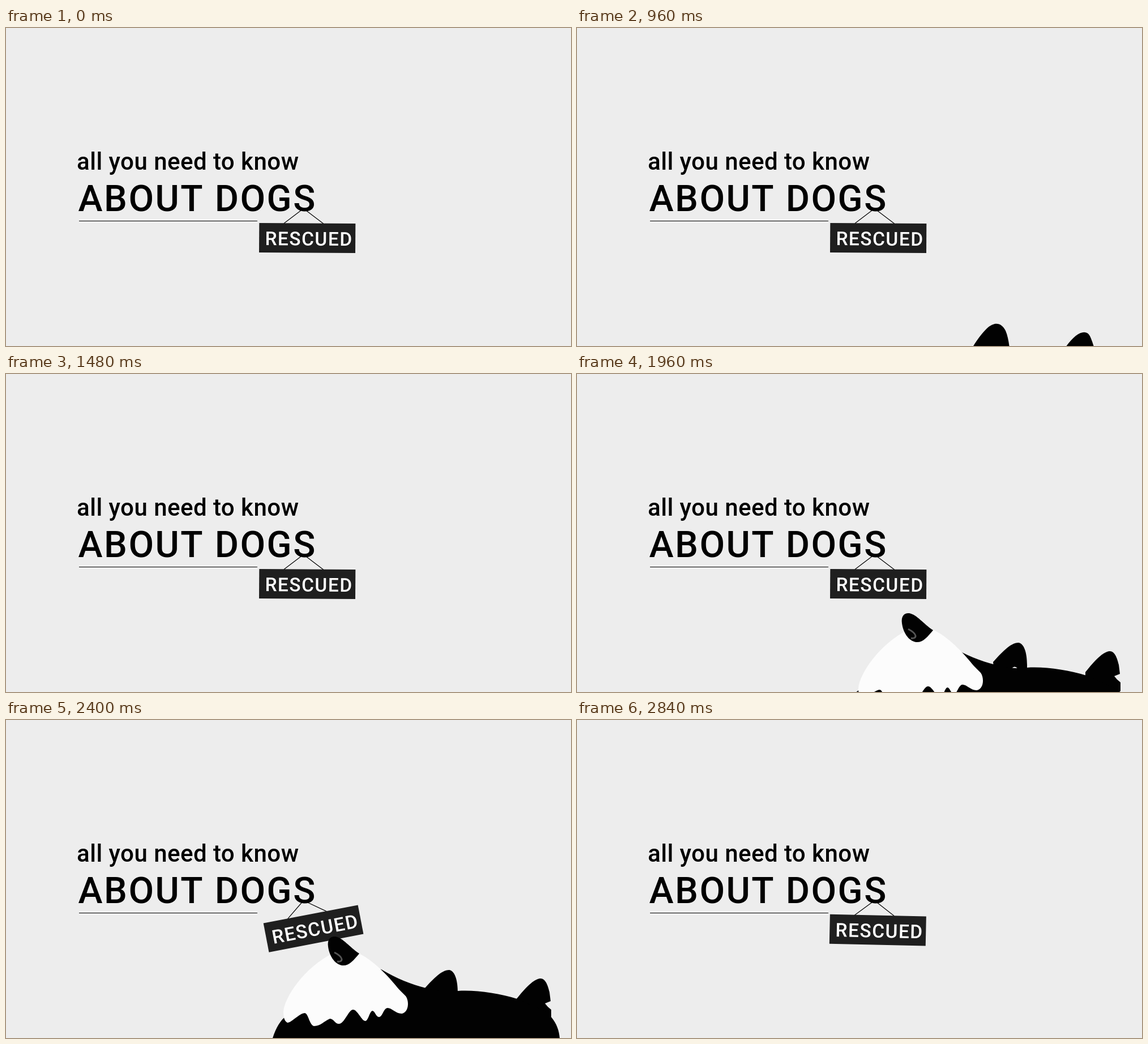
An HTML page with a canvas that plays this animation: 998 by 561 pixels, repeating every 3000 ms.

```html
<!DOCTYPE html>
<html lang="en">
<head>
<meta charset="utf-8">
<title>All you need to know about dogs</title>
<style>
  html, body { margin: 0; width: 100%; height: 100%; overflow: hidden; background: #ededed; }
  canvas { display: block; }
</style>
</head>
<body>
<canvas id="stage" width="998" height="561"></canvas>
<script>
const ctx = document.getElementById("stage").getContext("2d");
const WIDTH = 998, HEIGHT = 561, LOOP = 3000, STEP = 40;
const PAPER = "#ededed", BLACK = "#020202", WHITE = "#fcfcfc", BOARD = "#1f1f1f";
const PIVOT = { x: 525, y: 314 };

const leftPeek = {
  anchor: 633,
  head: new Path2D(`M633 561 L638 535 C638 505 642 470 649 453 C654 441 665 438 676 447
    C693 460 707 490 720 506 C740 503 770 503 803 506 C812 480 822 451 835 438
    C845 428 855 430 861 441 Q868 453 873 465 L863 473 Q869 480 877 480 L891 530 L905 561 Z`),
  ears: new Path2D(`M661 521 C659 500 662 486 670 484 C682 484 690 498 698 510 Q678 513 661 521 Z
    M812 506 C818 490 826 475 833 474 C842 474 846 494 848 511 Q830 506 812 506 Z`),
  // time, dx, drop, scaleX, scaleY
  keys: [
    [80, 0, 145, 1, .907], [120, 0, 95, 1, .907], [160, 0, 40, 1, .907], [200, 0, 10, 1.01, .907],
    [240, 0, 2, 1.025, .907], [280, 0, 0, 1.037, .907], [400, 0, 0, 1.037, .907],
    [440, 0, 0, 1.02, .98], [480, 0, 0, .98, 1.083], [520, 0, 0, 1, 1],
    [560, 0, 50, 1, 1], [600, 0, 105, 1, 1], [640, 0, 145, 1, 1]
  ]
};

const rightPeek = {
  anchor: 647,
  head: new Path2D(`M647 561 C658 541 672 518 689 505 C705 475 722 445 738 430
    C752 417 764 420 771 434 C778 450 779 475 780 493 C800 492 830 496 853 504
    C865 480 880 455 895 443 C908 433 918 435 922 448 Q927 460 930 475
    L919 482 Q925 488 933 490 L937 546 Q940 552 942 561 Z`),
  ears: new Path2D(`M732 494 C738 478 745 465 754 465 C763 466 768 478 769 493 Q750 491 732 494 Z
    M882 511 C888 498 894 489 901 489 C909 490 913 508 914 525 Q898 515 882 511 Z`),
  keys: [
    [920, -14, 145, 1, 1], [960, -14, 100, 1, 1], [1000, -14, 48, 1, 1], [1040, -14, 10, 1, 1],
    [1080, -10, 0, 1, 1.014], [1120, 0, 0, 1, 1], [1160, 1, 0, 1.03, 1], [1200, 2, 0, 1.045, 1],
    [1320, 2, 0, 1.045, 1], [1360, 2, 12, 1.045, 1], [1400, 2, 55, 1.03, 1],
    [1440, 2, 110, 1.02, 1], [1480, 2, 145, 1, 1]
  ]
};

const dog = {
  body: new Path2D(`M464 600 C467 560 480 533 495 522 L620 430 L663 440 C690 456 715 466 742 473
    C760 479 780 480 798 478 C830 476 870 482 903 492 L955 515 L963 524
    C973 536 977 548 978 561 L980 600 Z`),
  ears: new Path2D(`M738 475 C752 460 768 441 783 441 C794 443 798 462 798 480 V495 H740 Z
    M901 493 C918 472 932 457 944 456 C953 456 957 468 960 480 L962 496 L952 500
    Q957 507 963 511 V526 L955 535 L901 510 Z`),
  innerEar: new Path2D("M766 495 Q776 472 786 495 Z"),
  muzzle: new Path2D(`M490 514 C492 490 525 437 580 410 L624 412 C655 428 680 458 694 475
    L706 487 C713 497 711 516 699 518 C688 518 682 508 674 508 C667 508 665 524 659 524
    C653 524 652 513 647 513 C642 515 640 530 635 531 C628 531 621 511 613 511
    C605 511 598 536 588 536 C581 536 578 526 572 527 C562 531 556 540 544 540
    C536 538 534 518 528 517 C518 517 505 534 497 534 C491 531 490 522 490 514 Z`),
  nose: new Path2D(`M569 400 C567 386 574 381 582 382 C596 385 606 400 624 412
    C614 424 606 434 594 433 C580 431 571 415 569 400 Z`),
  shine: new Path2D("M580 410 Q592 416 593 422 Q593 427 585 426"),
  // time, drop
  keys: [
    [1840, 185], [1880, 145], [1920, 88], [1960, 40], [2000, 10], [2040, -4], [2080, -8],
    [2120, -7], [2160, -4], [2200, -2], [2240, 0], [2400, 0],
    [2440, 12], [2480, 55], [2520, 120], [2560, 185]
  ]
};

// time, degrees
const signKeys = [
  [0, .35], [1960, .35], [2000, -3], [2040, -10.5], [2080, -15.5], [2120, -16], [2160, -14],
  [2200, -11.8], [2240, -10.3], [2280, -9.9], [2320, -10.3], [2360, -10.7], [2400, -10.9],
  [2440, -9.5], [2480, -4.5], [2520, 2], [2560, 6.8], [2600, 8], [2640, 5.5], [2680, 1.5],
  [2720, -1.8], [2760, -2.2], [2800, -.4], [2840, 1.2]
];

function sample(keys, time) {
  const next = keys.findIndex(key => key[0] > time);
  if (next === 0) return keys[0].slice(1);
  if (next < 0) return keys[keys.length - 1].slice(1);
  const a = keys[next - 1], b = keys[next];
  const u = (time - a[0]) / (b[0] - a[0]);
  return a.slice(1).map((value, i) => value + (b[i + 1] - value) * u);
}

function fill(path, color, dx = 0, dy = 0) {
  ctx.save();
  ctx.translate(dx, dy);
  ctx.fillStyle = color;
  ctx.fill(path);
  ctx.restore();
}

function write(text, x, y, size, spacing, color) {
  ctx.font = `500 ${size}px Roboto, sans-serif`;
  ctx.letterSpacing = `${spacing}px`;
  ctx.fillStyle = color;
  ctx.fillText(text, x, y);
}

function drawSign(degrees) {
  const angle = degrees * Math.PI / 180;
  const cos = Math.cos(angle), sin = Math.sin(angle);
  ctx.strokeStyle = BLACK;
  ctx.lineWidth = 1.2;
  ctx.beginPath();
  for (const x of [-34, 36]) {
    ctx.moveTo(525.5, 318.5);
    ctx.lineTo(PIVOT.x + x * cos - 31 * sin, PIVOT.y + x * sin + 31 * cos);
  }
  ctx.stroke();

  ctx.save();
  ctx.translate(PIVOT.x, PIVOT.y);
  ctx.rotate(angle);
  ctx.fillStyle = BOARD;
  ctx.fillRect(-77.5, 30.5, 170, 52);
  write("RESCUED", -67.2, 69.5, 33.5, 1.5, "#fff");
  ctx.restore();
}

function drawPeek(peek, time) {
  const [dx, drop, scaleX, scaleY] = sample(peek.keys, time);
  ctx.save();
  ctx.translate(peek.anchor + dx, HEIGHT + drop);
  ctx.scale(scaleX, scaleY);
  ctx.translate(-peek.anchor, -HEIGHT);
  fill(peek.head, BLACK);
  fill(peek.ears, WHITE);
  ctx.restore();
}

function drawDog(time) {
  const [drop] = sample(dog.keys, time);
  // The ears trail the body, and the muzzle leans as it rises.
  const lean = Math.max(-.2, Math.min(1, drop / 40));
  const earDrop = drop - 7 * Math.max(0, lean);
  fill(dog.ears, BLACK, -3 * lean, earDrop);
  fill(dog.innerEar, WHITE, -3 * lean, earDrop);
  fill(dog.body, BLACK, -3 * lean, drop);
  fill(dog.muzzle, WHITE, 7 * lean, drop);
  ctx.save();
  ctx.translate(5 * lean, drop);
  fill(dog.nose, BLACK);
  ctx.strokeStyle = "#555";
  ctx.lineWidth = 3;
  ctx.stroke(dog.shine);
  ctx.restore();
}

function draw(now) {
  const time = Math.floor((now % LOOP) / STEP) * STEP;
  ctx.fillStyle = PAPER;
  ctx.fillRect(0, 0, WIDTH, HEIGHT);
  ctx.fillStyle = BLACK;
  ctx.fillRect(129, 340, 315, 1);
  drawSign(sample(signKeys, time)[0]);
  write("all you need to know", 125, 249.5, 42, .45, "#000");
  write("ABOUT DOGS", 127.5, 323, 64.7, 2.5, "#000");
  drawPeek(leftPeek, time);
  drawPeek(rightPeek, time);
  drawDog(time);
}

let start;
function tick(now) {
  start ??= now;
  draw(now - start);
  requestAnimationFrame(tick);
}
draw(0);
requestAnimationFrame(tick);
</script>
</body>
</html>
```
